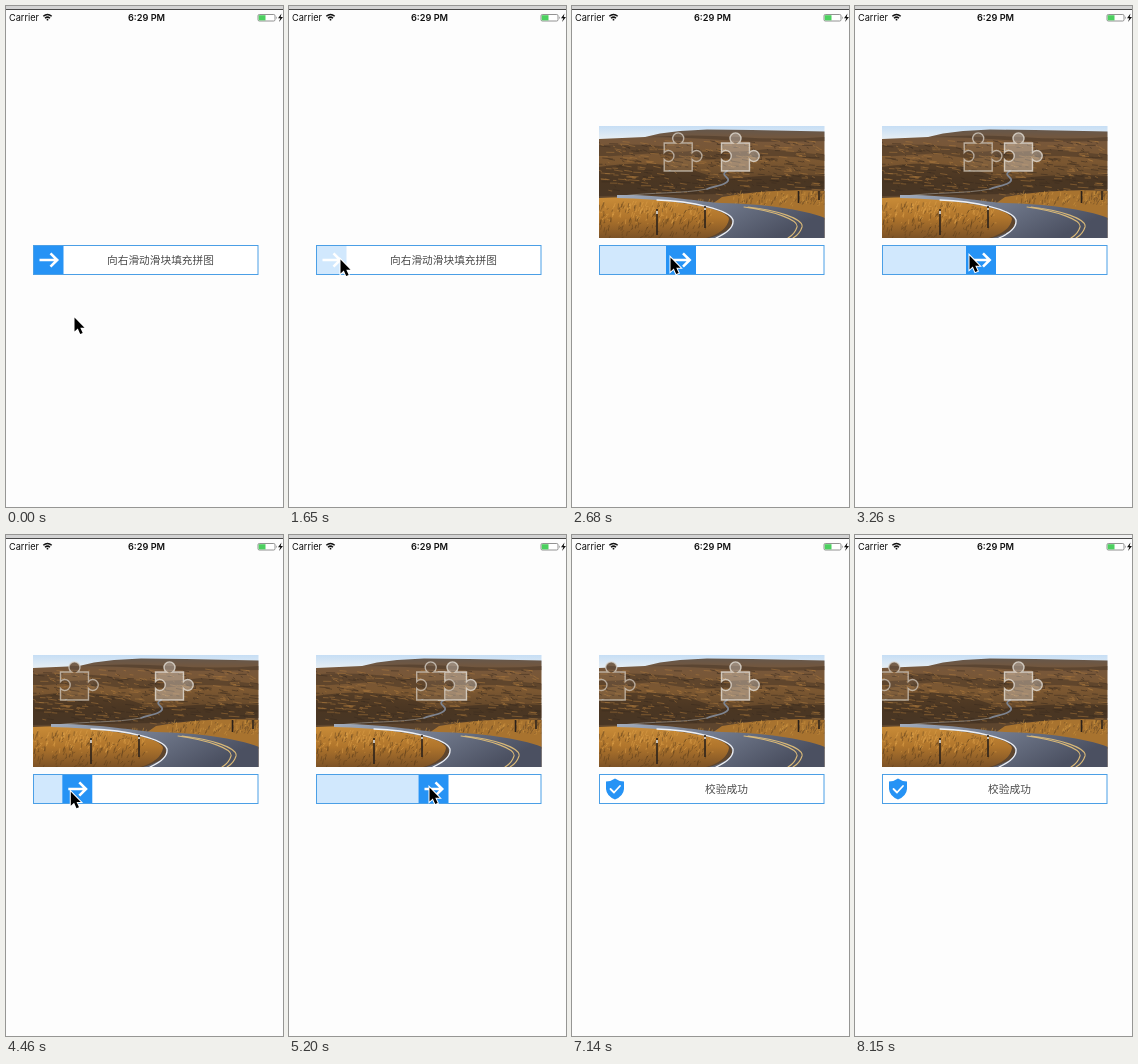
Recreate the animation shown at these times as an HTML page. Size 277x501 px, loop 8250 ms.

```html
<!DOCTYPE html>
<html lang="zh">
<head>
<meta charset="utf-8">
<title>Slider puzzle</title>
<style>
  html, body { margin: 0; width: 100%; height: 100%; overflow: hidden; background: #fdfdfd; }
  svg { display: block; width: 277px; height: 501px; }
  .bar { font: 9.2px Inter, Roboto, sans-serif; fill: #111; }
  .time { font-weight: 600; text-anchor: middle; }
  .tip { font: 10.7px "Noto Sans CJK SC", "Noto Sans CJK", sans-serif; fill: #4c4c4c; text-anchor: middle; }
  .line { fill: none; stroke-linecap: round; stroke-linejoin: round; }
  .sharp { fill: none; stroke-linecap: butt; stroke-linejoin: miter; }
</style>
</head>
<body>
<svg viewBox="0 0 277 501">
  <defs>
    <linearGradient id="sky" x2="0" y2="1">
      <stop stop-color="#c6def5"/><stop offset="1" stop-color="#eef2f3"/>
    </linearGradient>
    <linearGradient id="hill" x2="0" y2="1">
      <stop stop-color="#65574b"/><stop offset=".1" stop-color="#77573a"/>
      <stop offset=".3" stop-color="#7b5731"/><stop offset=".48" stop-color="#5f4429"/>
      <stop offset=".6" stop-color="#5d452e"/>
    </linearGradient>
    <linearGradient id="grass" x2="0" y2="1">
      <stop stop-color="#c98c38"/><stop offset=".5" stop-color="#b0752c"/><stop offset="1" stop-color="#7c5226"/>
    </linearGradient>
    <linearGradient id="road" x2="1" y2=".4">
      <stop stop-color="#a3adbd"/><stop offset=".45" stop-color="#747d90"/><stop offset="1" stop-color="#4b5061"/>
    </linearGradient>
    <clipPath id="frame"><rect x="27" y="120" width="225.500" height="112"/></clipPath>
    <path id="jig" d="M0 137H11A5.500 5.500 0 1 1 17 137H28V146.500A5.500 5.500 0 1 1 28 153.500V165H0V153.500A5.500 5.500 0 1 0 0 146.500Z"/>
    <clipPath id="cut"><use href="#jig" x="149.500"/></clipPath>
    <g id="photo">
      <rect x="27" y="120" width="226" height="16" fill="url(#sky)"/>
      <path fill="url(#hill)" d="M27 133L73 131L88 127.500L108 125L135 123.500L180 124L253 125.500V232H27Z"/>
      <path fill="#3f2f22" opacity=".45" d="M75 131Q120 128 165 131T253 131V135Q190 137 150 134T75 131ZM27 139Q75 137 115 143T195 143L253 149V155Q210 147 165 152T85 147L27 151Z"/>
      <path fill="#392a1e" opacity=".55" d="M27 161Q75 153 118 163L150 174Q200 167 253 170V183L150 188L27 190Z"/>
      <g id="slope" class="line" stroke-width=".9"></g>
      <path fill="#a8732f" d="M150 191Q200 182 253 185V214Q200 199 140 198Z"/>
      <path fill="url(#grass)" d="M27 192Q70 189 110 197Q155 203 157 213Q155 226 134 232H27Z"/>
      <g id="field" class="line" stroke-width=".8"></g>
      <path class="line" stroke="#7e8490" stroke-width="1.800" d="M155 165C149 168 154 170 156 173C158 178 143 180 135 183"/>
      <path class="line" stroke="#80776d" d="M135 183C110 188 80 186 50 190"/>
      <path fill="url(#road)" d="M45 189C90 188 130 196 150 197C190 198 230 203 253 212V232H137C164 225 166 213 150 206C130 198 90 193 45 192Z"/>
      <path class="line" stroke="#eef0f4" stroke-width="1.300" d="M85 194C120 195 158 204 161 214C162 222 153 228 144 232"/>
      <path class="line" stroke="#d8b878" stroke-width="1.100" d="M176 201C205 204 232 213 230 221Q228 228 221 232M172 201C202 205 227 214 225 221Q223 228 216 232"/>
      <path stroke="#2b211a" stroke-width="1.600" d="M85 203V229M133 200V222M226.500 185V197M247 185V194"/>
      <path stroke="#e8e4dc" stroke-width="1.600" d="M85 205V208M133 202V204"/>
    </g>
  </defs>

  <rect width="277" height="501" fill="#fdfdfd"/>
  <rect id="edge" width="277" height="3"/>
  <rect y="3" width="277" height="1" fill="#4a4a4a"/>

  <text class="bar" x="3" y="15">Carrier</text>
  <path class="sharp" stroke="#111" stroke-width="1.500" d="M37.300 10.300Q41.500 6.700 45.700 10.300M39 12.200Q41.500 10 44 12.200"/>
  <circle cx="41.500" cy="13.700" r=".9" fill="#111"/>
  <text class="bar time" x="140.500" y="15">6:29 PM</text>
  <rect x="252" y="8.500" width="17" height="6.500" rx="1.300" fill="#fff" stroke="#777" stroke-width=".8"/>
  <rect x="252.700" y="9.200" width="6.800" height="5.200" fill="#4cd05f"/>
  <path d="M270.200 10.300Q271.600 11.700 270.200 13.200Z" fill="#777"/>
  <path d="M275.500 7.500L272 12.200H274.300L273 16L277 11H274.700Z" fill="#111"/>

  <g id="picture" clip-path="url(#frame)">
    <use href="#photo"/>
    <use href="#jig" x="149.500" fill="#fff" fill-opacity=".3" stroke="#e9e4dd" stroke-opacity=".75" stroke-width="1.400"/>
    <g id="piece">
      <g clip-path="url(#cut)"><use href="#photo"/></g>
      <use href="#jig" x="149.500" fill="#fff" fill-opacity=".05" stroke="#d8d0c6" stroke-opacity=".7" stroke-width="1.400"/>
    </g>
  </g>

  <rect x="27" y="239" width="225" height="30" fill="#fff"/>
  <rect id="fill" x="27" y="239" height="30" fill="#d1e8fd"/>
  <text id="tip" class="tip" x="154.500" y="258"></text>
  <g id="thumb">
    <rect id="block" y="239" width="30" height="30"/>
    <path class="sharp" stroke="#fff" stroke-width="2.600" d="M6 254H23.500M17 247.300L23.700 254L17 260.700"/>
  </g>
  <rect id="border" x="27.500" y="239.500" width="224.500" height="29" fill="none"/>
  <g id="badge">
    <path id="shield" d="M43 243.500Q47 246.500 52 246.500V254Q51.500 261 43 264.500Q34.500 261 34 254V246.500Q39 246.500 43 243.500Z"/>
    <path id="mark" class="line" stroke="#fff" stroke-width="1.800"/>
  </g>

  <path id="cursor" fill="#000" stroke="#fff" stroke-width="2" paint-order="stroke" d="M.5 .5V14.500L3.800 11.500L6.200 17L8.700 16L6.300 10.800H10.500Z"/>
</svg>
<script>
const $ = id => document.getElementById(id);
const LOOP = 8250, BLUE = '#2693f5', RED = '#ee4b45';

// first step, last step, step count, slider x, cursor x, cursor y, mode
const moves = [
  [0, 0, 1, 27.5, 68, 311, 'idle'],
  [150, 150, 1, 27.5, 68, 312, 'idle'],
  [600, 1200, 5, 27.5, 54, 263, 'idle'],
  [1350, 1350, 1, 27.5, 51, 254, 'press'],
  [1650, 1650, 1, 27.5, 51, 253, 'press'],
  [1790, 2240, 4, 64, 68, 254, 'drag'],
  [2390, 2680, 3, 94, 98, 251, 'drag'],
  [2830, 3260, 4, 111, 114, 249, 'drag'],
  [3560, 3560, 1, 27, 114, 249, 'fail'],
  [3860, 4010, 2, 27, 34, 258, 'fail'],
  [4310, 5200, 7, 129.5, 140, 252, 'drag'],
  [5350, 5350, 1, 140, 147, 253, 'drag'],
  [5500, 5950, 4, 151, 154, 255, 'drag'],
  [6400, 6400, 1, 151.5, 154, 256, 'drag'],
  [6850, 6850, 1, 27, 154, 256, 'done'],
  [7140, 7140, 1, 27, -50, -50, 'done']
];

const prompt = '向右滑动滑块填充拼图';
const tips = { idle: prompt, press: prompt, drag: '', fail: '校验失败', done: '校验成功' };
const marks = { fail: 'M39.5 250.5L46.5 257.5M46.5 250.5L39.5 257.5', done: 'M38.5 254L42 257.5L48 251' };

let seed = 11;
const rnd = () => (seed = seed * 16807 % 2147483647) / 2147483647;

// short strokes scattered over a box
function scatter(layer, color, n, x, y, w, h, dx, dy) {
  let d = '';
  for (let i = 0; i < n; i++) {
    const px = x + rnd() * w, py = y + rnd() * h;
    d += `M${px.toFixed(1)} ${py.toFixed(1)}l${(dx * rnd()).toFixed(1)} ${(dy * rnd()).toFixed(1)}`;
  }
  const path = document.createElementNS('http://www.w3.org/2000/svg', 'path');
  path.setAttribute('d', d);
  path.setAttribute('stroke', color);
  path.setAttribute('opacity', .6);
  $(layer).append(path);
}
scatter('slope', '#3a2b1f', 240, 27, 135, 220, 52, 10, 1.5);
scatter('slope', '#a9773f', 170, 27, 134, 220, 38, 9, 1.5);
scatter('slope', '#a8763a', 80, 27, 170, 220, 18, 10, 1);
scatter('field', '#e0a34a', 130, 27, 196, 115, 22, 2, -5);
scatter('field', '#5c3d1c', 170, 27, 200, 110, 32, 2, -5);
scatter('field', '#d39a45', 70, 160, 188, 92, 12, 1.5, -4);
scatter('field', '#5c3f22', 70, 165, 187, 87, 12, 1.5, -4);

function pose(t) {
  let i = moves.length - 1;
  while (i && t < moves[i][0]) i--;
  const [start, end, n, x, cx, cy, mode] = moves[i];
  const prev = moves[i - 1] || moves[0];
  const gap = n > 1 ? (end - start) / (n - 1) : 1;
  const step = Math.min(n, 1 + Math.floor((t - start + 5) / gap));
  const mix = (a, b) => a + (b - a) * step / n;
  return { x: mix(prev[3], x), cx: mix(prev[4], cx), cy: mix(prev[5], cy), mode };
}

const set = (id, attrs) => { for (const k in attrs) $(id).setAttribute(k, attrs[k]); };
const show = (id, on) => { $(id).style.display = on ? '' : 'none'; };
const shift = (id, x, y = 0) => set(id, { transform: `translate(${x} ${y})` });

function draw(t) {
  const { x, cx, cy, mode } = pose(t);
  const ended = mode === 'fail' || mode === 'done';
  show('picture', ended || mode === 'drag');
  show('thumb', !ended);
  show('badge', ended);
  shift('piece', x - 1.8 - 149.5);
  shift('thumb', x);
  shift('cursor', cx, cy);
  set('fill', { width: mode === 'drag' ? x - 27 : 0 });
  set('block', { fill: mode === 'press' ? '#d1e8fd' : BLUE });
  set('border', { stroke: mode === 'fail' ? RED : '#4b9fe6' });
  set('shield', { fill: mode === 'fail' ? RED : BLUE });
  set('mark', { d: marks[mode] || '' });
  if ($('tip').textContent !== tips[mode]) $('tip').textContent = tips[mode];
  set('edge', { fill: t < 8150 ? '#d3d3d3' : '#f1f1f1' });
}

const begin = performance.now();
function tick() {
  draw((performance.now() - begin) % LOOP);
  requestAnimationFrame(tick);
}
draw(0);
requestAnimationFrame(tick);
</script>
</body>
</html>
```
